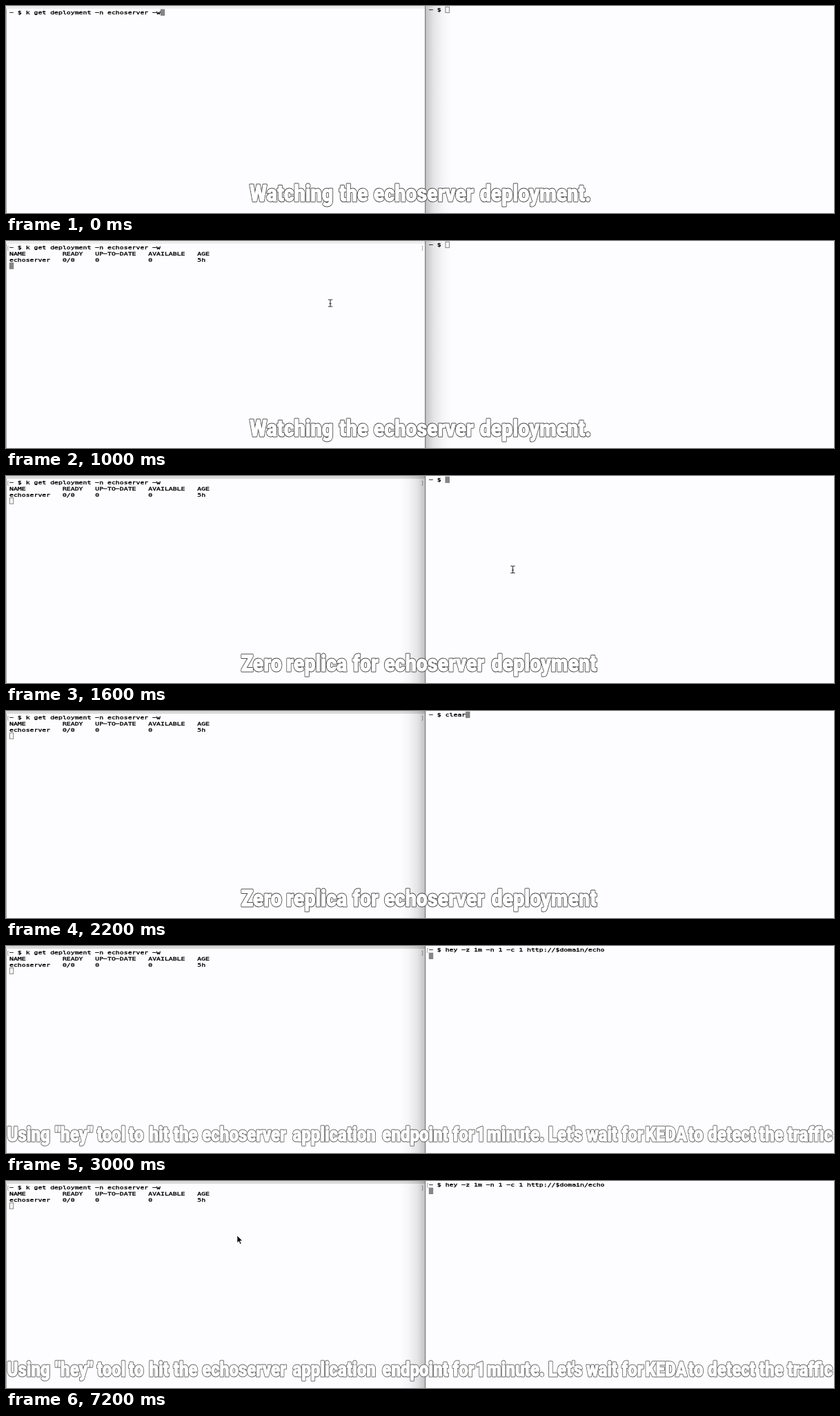
An HTML page for the animation above (8000 ms loop, 1200x300 px).

```html
<!DOCTYPE html>
<html lang="en">
<head>
<meta charset="utf-8">
<title>Watching a deployment</title>
<style>
  html, body { margin: 0; width: 100%; height: 100%; overflow: hidden; background: #fdfcfe; }
  svg { display: block; width: 100vw; height: 100vh; }
  text { white-space: pre; }
  .term { font: 7.7px "DejaVu Sans Mono", "Noto Sans Mono", monospace; fill: #000; stroke: #000; stroke-width: .3; }
  .mark { fill: #999; stroke: none; }
  .caption { font-family: Roboto, "Open Sans", sans-serif; font-weight: 900; font-stretch: 75%; text-anchor: middle; }
  .edge { stroke-width: 3; stroke-linejoin: round; }
  .face { fill: #fff; stroke: #fff; stroke-width: 1; stroke-linejoin: round; }
</style>
</head>
<body>
<svg id="stage" viewBox="0 0 1200 300">
  <defs>
    <linearGradient id="shade">
      <stop offset="0" stop-color="#000" stop-opacity=".23"/>
      <stop offset=".3" stop-color="#000" stop-opacity=".1"/>
      <stop offset=".65" stop-color="#000" stop-opacity=".03"/>
      <stop offset="1" stop-color="#000" stop-opacity="0"/>
    </linearGradient>
  </defs>
  <rect width="1200" height="300" fill="#fdfcfe"/>
  <rect id="bar" width="607" height="4"/>
  <rect y="4" width="1" height="296" fill="#a0a0a0"/>
  <g id="terms"></g>
  <rect id="shadeRight" x="608" width="38" height="300" fill="url(#shade)"/>
  <rect id="shadeLeft" x="-607" width="36" height="300" fill="url(#shade)" transform="scale(-1 1)"/>
  <rect x="607" width="1.2" height="300" fill="#7c7c7c"/>
  <g id="captions"></g>
  <path id="arrow" d="M0 0V10.6L2.5 8.4L4.3 12.6L6 11.8L4.3 7.8H7.7Z" fill="#000" stroke="#fff" stroke-width=".7"/>
  <path id="beam" d="M-3.2 -5H-1Q0 -5 0 -4V4Q0 5 -1 5H-3.2M3.2 -5H1Q0 -5 0 -4M3.2 5H1Q0 5 0 4M-1.6 .8H1.6" fill="none" stroke="#333" stroke-width="1.1"/>
</svg>
<script>
const LOOP = 8000, TICK = 100;
const CELL = 5.92, ROW = 8.9;
const WIDEN = CELL / (7.7 * 0.602);
const FOCUS_SWITCH = 1600;
const $ = id => document.getElementById(id);

function add(parent, tag, attrs = {}, content = '') {
  const el = document.createElementNS('http://www.w3.org/2000/svg', tag);
  for (const key in attrs) el.setAttribute(key, attrs[key]);
  el.textContent = content;
  parent.append(el);
  return el;
}

// Value of the last step that has begun.
const at = (steps, t) => steps.filter(s => s[0] <= t).pop()[1];
const show = (el, on) => el.setAttribute('visibility', on ? 'visible' : 'hidden');

function makeTerm(x, y) {
  const put = (col, row, cls) => add($('terms'), 'text', {
    class: cls,
    transform: `translate(${x + col * CELL} ${y + row * ROW}) scale(${WIDEN} 1)`
  });
  const rows = [0, 1, 2].map(r => put(0, r, 'term'));
  const open = put(-0.85, 0, 'term mark');
  const close = put(100.6, 0, 'term mark');
  const block = add($('terms'), 'rect', { width: 5.4, height: 8.4, stroke: '#777', 'stroke-width': 0.9 });
  return (lines, col, focused) => {
    rows.forEach((el, i) => el.textContent = (lines[i] || '').replace(/-/g, '\u2212'));
    const entered = col === 0;
    open.textContent = entered ? '[' : '';
    close.textContent = entered ? ']' : '';
    block.setAttribute('x', x + col * CELL + 0.3);
    block.setAttribute('y', y - 6.7 + (entered ? lines.length * ROW : 0));
    block.setAttribute('fill', focused ? '#868686' : '#fdfcfe');
  };
}

const left = makeTerm(5, 11.8);
const right = makeTerm(613, 8);

const watch = '~ $ k get deployment -n echoserver -w';
const head = 'NAME         READY   UP-TO-DATE   AVAILABLE   AGE';
const item = 'echoserver   0/0     0            0           5h';
const load = '~ $ hey -z 1m -n 1 -c 1 http://$domain/echo';

const leftSteps = [
  [0, [[watch], watch.length]],
  [700, [[watch], 0]],
  [800, [[watch, head], 0]],
  [900, [[watch, head, item], 0]]
];
const rightSteps = [
  [0, [['~ $ '], 4]],
  [2200, [['~ $ clear'], 9]],
  [2700, [[load], load.length]],
  [3000, [[load], 0]]
];

// One condensing factor brings the installed face to a poster-like width.
const probe = add($('captions'), 'text', { class: 'caption', 'font-size': 100 }, 'echoserver');
const condense = 4.27 / (probe.getComputedTextLength() / 100);
probe.remove();

// Each word is centred between its own start and the next word's start, less a space.
function makeCaption(text, size, edge, starts) {
  const gap = size * 0.16;
  const group = add($('captions'), 'g', { class: 'caption', 'font-size': size, transform: `scale(${condense} 1)` });
  const id = 'words' + starts.length;
  const words = add(document.querySelector('defs'), 'g', { id });
  text.split(' ').forEach((word, i) => {
    const middle = (starts[i] + starts[i + 1] - gap) / 2;
    add(words, 'text', { x: middle / condense, y: 282.7 }, word);
  });
  add(group, 'use', { href: '#' + id, class: 'edge', fill: edge, stroke: edge });
  add(group, 'use', { href: '#' + id, class: 'face' });
  return group;
}

const captions = [
  makeCaption('Watching the echoserver deployment.', 34, '#505050', [350, 483, 530, 686, 854]),
  makeCaption('Zero replica for echoserver deployment', 34, '#505050', [342, 404, 502, 546, 701, 864]),
  makeCaption('Using "hey" tool to hit the echoserver application endpoint for 1 minute. Let\'s wait for KEDA to detect the traffic',
    28.6, '#686868', [1, 69, 133, 177, 205, 243, 282, 413, 543, 648, 683, 697, 785, 841, 891, 930, 988, 1016, 1092, 1131, 1204])
];
const captionSteps = [[0, 0], [1100, 1], [2500, 2]];

// Pointer glides: start, end, then the points passed on the way.
const glides = [
  [1000, 1300, [[470, 90], [738, 133]]],
  [1600, 1600, [[734.5, 135.5]]],
  [2200, 2200, []],
  [6400, 6700, [[734.5, 135.5], [252, 57]]],
  [6900, 7000, [[205, 26], [166, 2]]],
  [7000, 7200, [[166, 2], [335, 79]]]
];

function pointer(t) {
  const glide = glides.filter(g => g[0] <= t).pop();
  if (!glide || !glide[2].length) return null;
  const [from, to, [a, b = a]] = glide;
  const p = to > from ? Math.min(1, (t - from) / (to - from)) : 1;
  const k = p * p * (3 - 2 * p);
  return a.map((v, i) => v + (b[i] - v) * k);
}

function render(time) {
  const t = Math.floor((time % LOOP) / TICK) * TICK;
  const rightFocus = t >= FOCUS_SWITCH;
  left(...at(leftSteps, t), !rightFocus);
  right(...at(rightSteps, t), rightFocus);
  $('bar').setAttribute('fill', rightFocus ? '#dadada' : '#ececec');
  show($('shadeRight'), !rightFocus);
  show($('shadeLeft'), rightFocus);
  captions.forEach((el, i) => show(el, i === at(captionSteps, t)));

  const pos = pointer(t);
  const overRight = pos && pos[0] > 607;
  const text = overRight === rightFocus;
  show($('arrow'), pos && !text);
  show($('beam'), pos && text);
  if (pos) [$('arrow'), $('beam')].forEach(el => el.setAttribute('transform', `translate(${pos})`));
}

const begin = performance.now();
function frame() {
  render(performance.now() - begin);
  requestAnimationFrame(frame);
}
frame();
</script>
</body>
</html>
```
